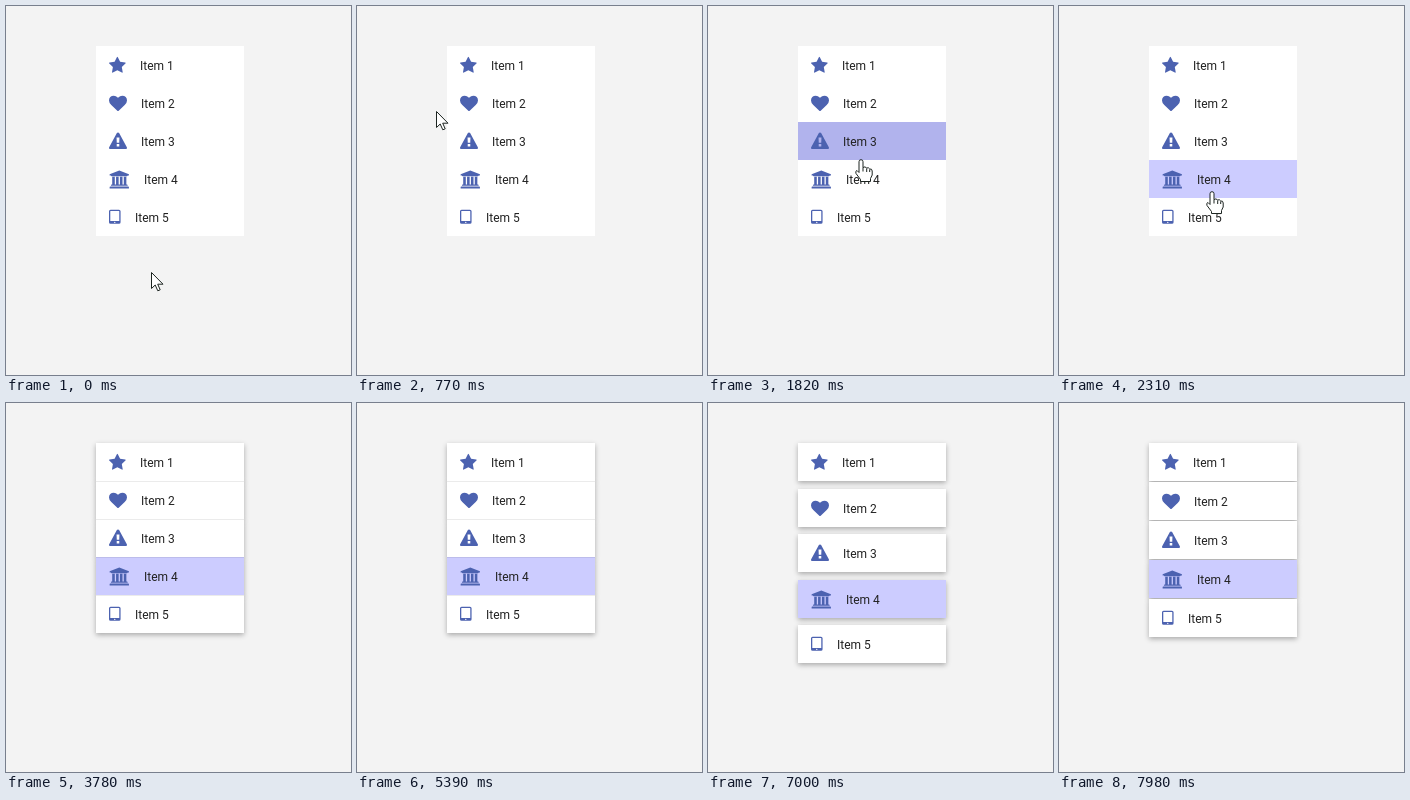
An HTML page for the animation above (8 s loop, 345x369 px).

```html
<!DOCTYPE html>
<html lang="en">
<head>
<meta charset="utf-8">
<title>Item list</title>
<style>
  html, body { margin: 0; width: 100%; height: 100%; overflow: hidden; background: #f3f3f3; }
  .row, .shade { position: absolute; left: 90px; top: 40px; width: 148px; height: 38px; }
  .shade { box-shadow: 0 2px 5px rgba(0,0,0,.3); }
  svg { position: absolute; left: 0; top: 0; overflow: visible; }
  text { font: 12px Roboto, Arial, sans-serif; fill: #222; }
  .icon { fill: #4c62b0; fill-rule: evenodd; }
  #arrow, #hand { fill: #fff; stroke: #1c2420; stroke-width: 1; stroke-linejoin: round; }
</style>
</head>
<body>
<svg id="pointer" width="345" height="369">
  <path id="arrow" d="M.5.5V16.5L4.2 13L6.8 18.8L9.2 17.8L6.7 12.2H12Z"/>
  <path id="hand" d="M-2 1.7a2 2 0 0 1 4 0V7.5Q4 6 5.7 8Q7.5 7 8.7 9Q11 8.5 11.2 11V15L9.5 18.5V21.5H-.5V19.5L-5 13.5Q-6 11-4 10.5L-2 12.5ZM2 7.5v4M5.7 8.5v3.5M8.7 9.5v2.5"/>
</svg>
<script>
const LOOP = 8000, TICK = 70, ROW = 38, GAP = 15;
const WHITE = [255, 255, 255], HOVER = [177, 179, 237], ACTIVE = [204, 204, 255];

// Icon outlines on a 1792-unit em; w is the advance, dx the left shift.
const ICONS = [
  { w: 1664, dx: -64, d: 'M1728 647q0 22-26 48l-363 354 86 500q1 7 1 20 0 21-10.5 35.5t-30.5 14.5q-19 0-40-12l-449-236-449 236q-22 12-40 12-21 0-31.5-14.5t-10.5-35.5q0-6 2-20l86-500-364-354q-25-27-25-48 0-37 56-46l502-73 225-455q19-41 49-41t49 41l225 455 502 73q56 9 56 46z' },
  { w: 1792, dx: 0, d: 'M896 1664q-26 0-44-18l-624-602Q0 820 0 596q0-220 127-344t351-124q210 0 418 216 208-216 418-216 224 0 351 124t127 344q0 221-229 450l-623 600q-18 18-44 18z' },
  { w: 1792, dx: 0, d: 'M768 1152h256v256H768zM752 512h288l-20 512H772zM1008 67l768 1408q35 63-2 126-37 63-110 63H128q-73 0-110-63-37-63-2-126L784 67q37-67 112-67t112 67z' },
  { w: 2048, dx: 64, d: 'M960 0l960 384v128h-128q0 64-69 64H197q-69 0-69-64H0V384zM256 640h256v768h128V640h256v768h128V640h256v768h128V640h256v768h59q69 0 69 64v64H128v-64q0-64 69-64h59zM69 1600h1782q69 0 69 64v128H0v-128q0-64 69-64z' },
  { w: 1152, dx: 0, d: 'M160 128h832q160 0 160 160v1088q0 160-160 160H160Q0 1536 0 1376V288Q0 128 160 128zM128 288v960h896V288q0-32-32-32H160q-32 0-32 32zM512 1392a64 64 0 1 0 128 0a64 64 0 1 0-128 0z' }
];

// Pointer path: time, x, y
const PATH = [
  [0, 145, 266], [70, 138, 262], [210, 80, 225], [350, 24, 180], [490, 26, 142],
  [700, 66, 112], [840, 91, 97], [910, 102, 98], [1190, 150, 101], [1330, 154, 104],
  [1680, 153, 143], [2240, 153, 186], [2520, 153, 186], [2660, 108, 250], [2800, 30, 348], [2870, 10, 390]
];

// Hover start and end for each row
const HOVERS = [null, [880, 1470], [1470, 1890], [1890, Infinity], null];
const PICKED = 2170;

const pointer = document.getElementById('pointer');
const arrow = document.getElementById('arrow');
const hand = document.getElementById('hand');

function addDiv(name, html = '') {
  const el = document.createElement('div');
  el.className = name;
  el.innerHTML = html;
  document.body.insertBefore(el, pointer);
  return el;
}

const shades = ICONS.map(() => addDiv('shade'));
const rows = ICONS.map(({ w, dx, d }, i) => {
  const em = 18 / 1792, labelX = Math.round(13 + w * em + 14.2);
  return addDiv('row', `<svg width="148" height="38">
    <path class="icon" transform="translate(13 10.4) scale(${em}) translate(${dx})" d="${d}"/>
    <text x="${labelX}" y="24">Item ${i + 1}</text></svg>`);
});

const clamp = v => Math.min(1, Math.max(0, v));
const ramp = (t, start, span) => clamp((t - start) / span);
const lerp = (a, b, p) => a + (b - a) * p;
const mix = (a, b, p) => a.map((v, i) => lerp(v, b[i], p));

// cubic-bezier(.42, 0, .58, 1)
function easeInOut(x) {
  if (x <= 0 || x >= 1) return clamp(x);
  let lo = 0, hi = 1;
  for (let i = 0; i < 30; i++) {
    const s = (lo + hi) / 2, r = 1 - s;
    if (1.26 * s * r * r + 1.74 * s * s * r + s ** 3 < x) lo = s; else hi = s;
  }
  return lo * lo * (3 - 2 * lo);
}

function gapAt(t) {
  const move = start => easeInOut(ramp(t, start, 500));
  return GAP * (move(5360) - move(6750) + move(7890));
}

function rowColor(i, t) {
  const span = HOVERS[i];
  if (!span) return WHITE;
  const level = ramp(t, span[0], 100) - ramp(t, span[1], 100);
  const color = mix(WHITE, HOVER, level);
  return i === 3 ? mix(color, ACTIVE, ramp(t, PICKED, 140)) : color;
}

function pointerAt(t) {
  const n = PATH.findIndex(k => k[0] > t);
  if (n < 0) return null;
  const a = PATH[n - 1], b = PATH[n];
  const p = ramp(t, a[0], b[0] - a[0]);
  return [lerp(a[1], b[1], p), lerp(a[2], b[2], p)].map(Math.round);
}

function draw(t) {
  const gap = gapAt(t), raised = t >= 3780;
  rows.forEach((row, i) => {
    const shift = `translateY(${Math.round(i * (ROW + gap) + 1e-6)}px)`;
    row.style.transform = shades[i].style.transform = shift;
    row.style.background = `rgb(${rowColor(i, t).map(Math.round)})`;
    row.style.boxShadow = raised && i && gap < 0.5 ? 'inset 0 1px rgba(0,0,0,.08)' : 'none';
    shades[i].style.visibility = raised ? 'visible' : 'hidden';
  });

  const tip = pointerAt(t);
  pointer.style.display = tip ? 'block' : 'none';
  if (!tip) return;
  const overRow = t >= 910 && t < 2660;
  arrow.style.display = overRow ? 'none' : 'inline';
  hand.style.display = overRow ? 'inline' : 'none';
  for (const shape of [arrow, hand]) shape.setAttribute('transform', `translate(${tip})`);
}

function frame() {
  const t = performance.now() % LOOP;
  draw(Math.floor(t / TICK) * TICK);
  requestAnimationFrame(frame);
}
frame();
</script>
</body>
</html>
```
